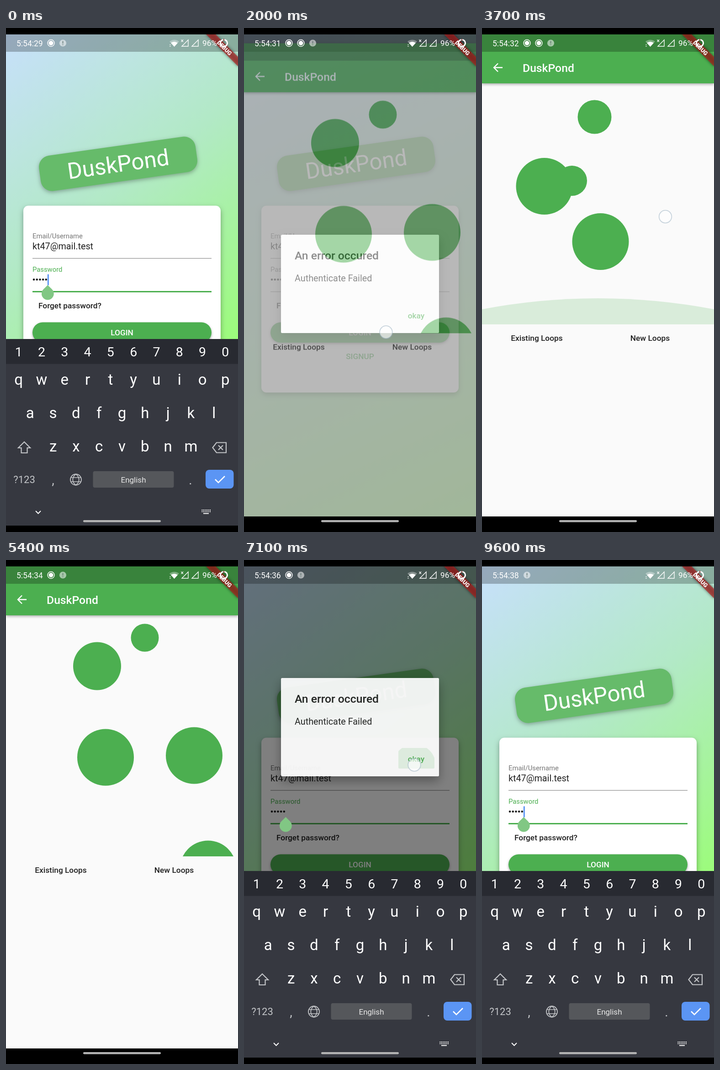
Recreate the animation shown at these times as an HTML page with a canvas. Size 508 by 1102 pixels, loop 9.7 s.

```html
<!DOCTYPE html>
<html lang="en">
<head>
<meta charset="utf-8">
<title>Login demo</title>
<style>
html, body { margin: 0; width: 100%; height: 100%; overflow: hidden; background: #000; }
canvas { display: block; }
</style>
</head>
<body>
<canvas id="stage" width="508" height="1102"></canvas>
<script>
const W = 508, H = 1102, LOOP = 9700, TOP = 14, BAR = 52, NAV = 1068, KB = 680;
const GREEN = '#4caf50', INK = '#212121', BRAND = 'DuskPond', EMAIL = 'kt47@mail.test';
const LOGIN_REACH = 169.5, HOME_REACH = 640, KB_HEIGHT = 408;
const screen = document.getElementById('stage').getContext('2d');
const scratch = document.createElement('canvas');
scratch.width = W;
scratch.height = H;
const buffer = scratch.getContext('2d');
let c = screen;

const clamp = v => Math.max(0, Math.min(1, v));
const span = (t, a, b) => clamp((t - a) / (b - a));
const ease = (t, a, b) => (p => p * p * (3 - 2 * p))(span(t, a, b));
const within = (t, a, b) => t >= a && t < b;
// Rises from 0 to 1 over a..b and falls back over d..e.
const pulse = (t, a, b, d, e) => ease(t, a, b) - ease(t, d, e);

function rect(x, y, w, h, color) {
  c.fillStyle = color;
  c.fillRect(x, y, w, h);
}

function round(x, y, w, h, r, color) {
  c.fillStyle = color;
  c.beginPath();
  c.roundRect(x, y, w, h, r);
  c.fill();
}

function disc(x, y, r, color) {
  c.fillStyle = color;
  c.beginPath();
  c.arc(x, y, r, 0, 7);
  c.fill();
}

function ring(x, y, r, color, width) {
  c.strokeStyle = color;
  c.lineWidth = width;
  c.beginPath();
  c.arc(x, y, r, 0, 7);
  c.stroke();
}

function path(d, color, width) {
  const p = new Path2D(d);
  if (width) {
    c.strokeStyle = color;
    c.lineWidth = width;
    c.stroke(p);
  } else {
    c.fillStyle = color;
    c.fill(p);
  }
}

function text(s, x, y, size, color, weight = 400, align = 'left') {
  c.font = `${weight} ${size}px Roboto, sans-serif`;
  c.textAlign = align;
  c.fillStyle = color;
  c.fillText(s, x, y);
}

function shaded(blur, dy, alpha, draw) {
  c.save();
  c.shadowBlur = blur;
  c.shadowOffsetY = dy;
  c.shadowColor = `rgba(0,0,0,${alpha})`;
  draw();
  c.restore();
}

function clipped(y0, y1, draw) {
  c.save();
  c.beginPath();
  c.rect(0, y0, W, y1 - y0);
  c.clip();
  draw();
  c.restore();
}

// Draws a group and blends it as one picture.
function layer(alpha, dy, draw) {
  if (alpha <= 0) return;
  buffer.clearRect(0, 0, W, H);
  c = buffer;
  draw();
  c = screen;
  c.globalAlpha = alpha;
  c.drawImage(scratch, 0, dy);
  c.globalAlpha = 1;
}

const focused = t => t < 950 || t > 6450;
const loginScroll = t => LOGIN_REACH * (pulse(t, 100, 600, 900, 1200) + pulse(t, 7400, 7700, 8400, 8900));
const homeScroll = t => HOME_REACH * pulse(t, 2700, 3600, 4000, 4900);

function backdrop(bottom) {
  const g = c.createLinearGradient(0, TOP, W, bottom);
  ['#c7e0fb', '#b2e9c6', '#9cfc7b'].forEach((color, i) => g.addColorStop(i / 2, color));
  rect(0, TOP, W, bottom - TOP, g);
}

function logo() {
  c.save();
  c.translate(245.5, 297);
  c.rotate(-8 * Math.PI / 180);
  shaded(10, 3, .3, () => round(-173, -39, 346, 78, 25, '#66bb6a'));
  text(BRAND, 0, 18, 49.4, '#fff', 400, 'center');
  c.restore();
}

function login(t, bottom) {
  const active = focused(t);
  backdrop(bottom);
  c.save();
  c.translate(0, -loginScroll(t));
  logo();
  shaded(12, 5, .35, () => round(38, 388.5, 432, 408.5, 11, '#fff'));
  text('Email/Username', 58, 460, 14.8, '#757575');
  text(EMAIL, 58, 484, 19.8, INK);
  rect(58, 503, 392, 1.2, '#8c8c8c');
  text('Password', 58, 533, 14.8, active ? GREEN : '#757575');
  for (let i = 0; i < 5; i++) disc(61 + 6.7 * i, 550, 2.3, INK);
  rect(58, active ? 575 : 576, 392, active ? 3 : 1.2, active ? GREEN : '#8c8c8c');
  const blinkOn = t < 900 || (t + 600) % 1000 < 500;
  if (active && blinkOn) rect(91, 538.5, 2.5, 24, '#4285f4');
  text('Forget password?', 71, 613, 17.3, INK, 500);
  shaded(5, 2.5, .35, () => round(58, 643.5, 392, 44.5, 22.2, GREEN));
  text('LOGIN', 254, 672, 17.3, '#fff', 500, 'center');
  text('SIGNUP', 254, 724, 17.3, GREEN, 500, 'center');
  c.restore();
  rect(0, TOP, W, BAR - TOP, 'rgba(0,0,0,.25)');
}

// The caret handle floats above the dimmed page.
function handle(t) {
  if (!focused(t)) return;
  const y = 581 - loginScroll(t);
  disc(91.3, y, 13.4, '#81c784');
  path(`M91.3 ${y - 19}l9.5 9.5h-19Z`, '#81c784');
}

function dialog(t, bottom) {
  c.save();
  c.translate(0, (BAR + bottom) / 2 - .5);
  shaded(22, 10, .35, () => round(81, -107.5, 346, 215, 2.5, '#fff'));
  text('An error occured', 111, -53.5, 24.7, INK, 500);
  text('Authenticate Failed', 111, -5.5, 19.8, INK);
  c.save();
  c.beginPath();
  c.roundRect(338, 45.5, 79, 45, 2.5);
  c.clip();
  disc(373, 84, 56 * span(t, 6950, 7130), 'rgba(76,175,80,.14)');
  c.restore();
  text('okay', 377, 75.5, 17.3, GREEN, 500, 'center');
  c.restore();
}

// Loop bubbles as x, y and, where it is not the full size, radius.
const BUBBLES = [
  [304, 170, 30.5], [199.5, 232, 52.5], [218, 431.5], [412, 427.5], [442.5, 675.5],
  [246.5, 834.5, 37], [136.5, 986], [197, 974, 33], [259.5, 1107]
];

function glow(edge, dir, power) {
  const side = edge + dir * 33 * power, peak = edge + dir * 81 * power;
  path(`M0 ${edge}V${side}Q254 ${peak} 508 ${side}V${edge}Z`, `rgba(76,175,80,${.19 * power})`);
}

function home(t) {
  rect(0, TOP, W, NAV - TOP, '#fafafa');
  clipped(121, 648, () => {
    for (const [x, y, r = 62] of BUBBLES) disc(x, y - homeScroll(t), r, GREEN);
    glow(648, -1, pulse(t, 3500, 3680, 3780, 4050));
    glow(121, 1, pulse(t, 4800, 4950, 5000, 5350));
  });
  text('Existing Loops', 120, 684, 17.3, INK, 500, 'center');
  text('New Loops', 368, 684, 17.3, INK, 500, 'center');
  shaded(6, 2, .35, () => rect(0, TOP, W, 107, GREEN));
  rect(0, TOP, W, BAR - TOP, 'rgba(0,0,0,.25)');
  path('M45 86.5H27M35 77.5L26 86.5L35 95.5', '#fff', 2.4);
  text(BRAND, 89, 96, 24.7, '#fff', 500);
}

function banner() {
  clipped(TOP, NAV, () => {
    c.translate(W, TOP);
    c.rotate(Math.PI / 4);
    c.filter = 'blur(3px)';
    rect(-49.5, 34.6, 99, 14.8, 'rgba(0,0,0,.5)');
    c.filter = 'none';
    rect(-49.5, 34.6, 99, 14.8, 'rgba(183,28,28,.63)');
    text('DEBUG', 0, 46.4, 12.4, '#fff', 900, 'center');
  });
}

// Keys stand centred on one even pitch.
function keyRow(keys, y, size, center = W / 2) {
  [...keys].forEach((k, i) => text(k, center + 50.3 * (i - (keys.length - 1) / 2), y, size, '#fff', 400, 'center'));
}

function keyboard(drop) {
  if (drop >= KB_HEIGHT) return;
  const soft = '#c3c5c8';
  clipped(TOP, KB + KB_HEIGHT, () => {
    c.translate(0, drop);
    rect(0, KB, W, KB_HEIGHT, '#363840');
    rect(0, KB, W, 54.5, '#282a31');
    keyRow('1234567890', 718, 28.5);
    ['qwertyuiop', 'asdfghjkl', 'zxcvbnm'].forEach((keys, i) => keyRow(keys, 779.5 + 73 * i, 33));
    path('M40 905L53 918H46.5V929H33.5V918H27Z', soft, 2.2);
    path('M452.5 917.5L461 906.5H482V928.5H461ZM465 912.5L475 922.5M475 912.5L465 922.5', soft, 2.2);
    text('?123', 40, 995, 22, soft, 400, 'center');
    text(',', 103, 998, 28, soft, 400, 'center');
    text('.', 404, 998, 28, soft, 400, 'center');
    ring(153, 987.5, 12, soft, 1.8);
    path('M142 983H164M142 992H164M153 975.5C144 982 144 993 153 999.5C162 993 162 982 153 975.5', soft, 1.7);
    round(190.5, 969, 177, 36, 4, '#55575b');
    text('English', 279, 993.5, 17, '#e8e8e8', 400, 'center');
    round(437, 966, 61.5, 41, 8, '#5b95f4');
    path('M458 987L465 994L479 980', '#fff', 2.6);
    path('M65 1056L70.5 1061.5L76 1056', '#fff', 2);
    for (let i = 0; i < 12; i++) rect(428.5 + i % 6 * 3.5, 1053 + (i / 6 | 0) * 3.5, 2, 2, '#fff');
    rect(432, 1060.5, 12, 2, '#fff');
  });
}

function statusBar(t) {
  text('5:54:' + (29 + Math.floor((t + 100) / 1000)), 23, 39.5, 17.5, '#fff');
  const dots = within(t, 0, 9400) + within(t, 1900, 4900);
  for (let i = 0; i < dots; i++) {
    ring(98.5 + 26 * i, 33, 7.4, '#fff', 1.5);
    disc(98.5 + 26 * i, 33, 5, '#fff');
  }
  const x = 98.5 + 26 * dots;
  disc(x, 33, 7.6, 'rgba(255,255,255,.55)');
  rect(x - .9, 28.5, 1.8, 5.5, 'rgba(90,110,105,.8)');
  rect(x - .9, 35.5, 1.8, 1.8, 'rgba(90,110,105,.8)');
  path('M368.5 41L358 29.5Q368.5 22 379 29.5Z', 'rgba(255,255,255,.35)');
  path('M368.5 41L361 32.5Q368.5 27.5 376 32.5Z', '#fff');
  path('M358 36.5H361M358 40H361', 'rgba(255,255,255,.7)', 1.4);
  path('M383.5 25.5L388 30.5M388 25.5L383.5 30.5', '#fff', 1.2);
  path('M399 26V40H385ZM421 26V40H407Z', '#fff', 1.4);
  text('96%', 430, 39, 17.3, '#fff');
  ring(477, 33, 7.6, '#fff', 3);
  rect(476, 23.5, 2, 5, 'rgba(120,50,45,.9)');
}

function touch(x, y) {
  disc(x, y, 13.5, 'rgba(255,255,255,.65)');
  ring(x, y, 13.8, 'rgba(165,185,200,.6)', 1.8);
}

function finger(t) {
  // Dragging fingers follow the scrolled content; the long list takes several strokes.
  const dragLogin = within(t, 100, 700) || within(t, 7400, 7900) || within(t, 8400, 8900);
  const dragHome = within(t, 2700, 3800) || within(t, 4000, 4900);
  if (dragLogin) touch(377, 561 - loginScroll(t));
  if (dragHome) touch(401.5, 412.5 + (HOME_REACH - homeScroll(t)) % (HOME_REACH / 3));
  if (within(t, 750, 950)) touch(70, 1058);
  if (within(t, 1700, 2200)) touch(311, 665);
  if (within(t, 6300, 6500)) touch(35, 86);
  if (within(t, 6900, 7200)) touch(373, 448);
}

function draw(t) {
  const drop = KB_HEIGHT * pulse(t, 900, 1250, 6400, 6700);
  const bottom = Math.min(KB + drop, NAV);
  const page = span(t, 1800, 2100) - span(t, 6380, 6680);
  const modal = span(t, 1800, 1950) - span(t, 7090, 7240);

  rect(0, 0, W, H, '#000');
  if (page < 1) {
    clipped(TOP, bottom, () => {
      login(t, bottom);
      rect(0, TOP, W, NAV - TOP, `rgba(0,0,0,${.54 * modal})`);
      handle(t);
      layer(modal, 0, () => dialog(t, bottom));
    });
  }
  clipped(TOP, NAV, () => layer(page ** 1.7, 263 * (1 - page) ** 2.35, () => home(t)));
  banner();
  keyboard(drop);
  statusBar(t);
  round(169, 1076, 170, 4.5, 2.2, '#b5b5b5');
  finger(t);
}

const start = performance.now();
function frame() {
  draw((performance.now() - start) % LOOP);
  requestAnimationFrame(frame);
}
frame();
</script>
</body>
</html>
```
